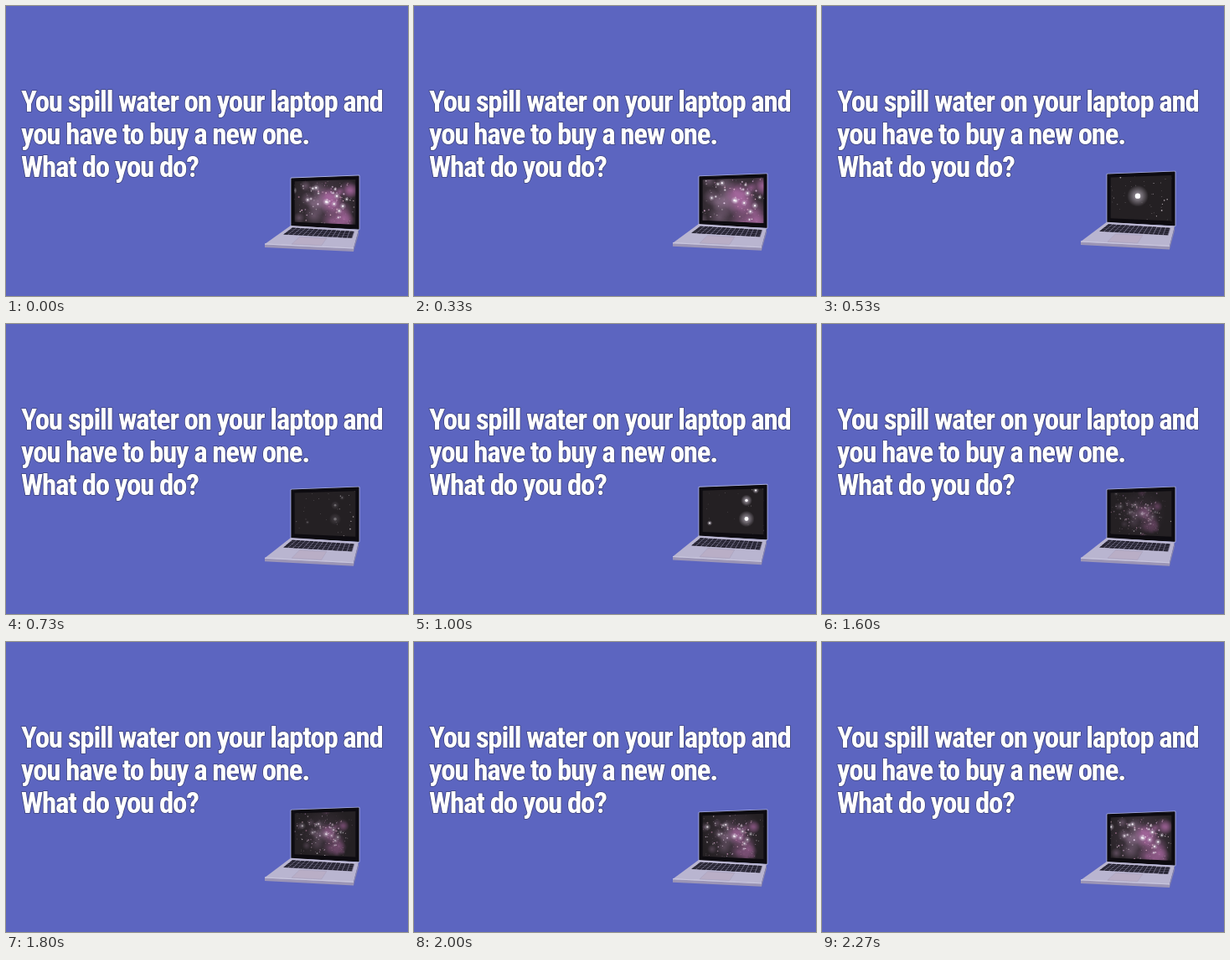
An HTML page with a canvas that plays this animation: 480 px wide and 346 px high, repeating every 2340 ms.

```html
<!DOCTYPE html>
<html lang="en">
<head>
<meta charset="utf-8">
<title>Laptop question</title>
<style>
  html, body { margin: 0; width: 100%; height: 100%; overflow: hidden; background: #5c65c0; }
  canvas, svg { position: absolute; left: 0; top: 0; display: block; }
  text {
    font-family: "Roboto Condensed", Roboto, sans-serif;
    font-weight: 900;
    font-stretch: 75%;
    letter-spacing: -.035em;
    fill: #fff;
    stroke: #3d437c;
    stroke-width: 1.6px;
    stroke-linejoin: round;
    paint-order: stroke;
  }
</style>
</head>
<body>
<canvas id="view" width="480" height="346"></canvas>
<svg id="words" width="480" height="346" font-size="35">
  <text x="18" y="126">You spill water on your laptop and</text>
  <text x="18" y="165">you have to buy a new one.</text>
  <text x="18" y="204">What do you do?</text>
</svg>
<script>
const LOOP = 2340, STEPS = 35;
const ctx = document.getElementById('view').getContext('2d');
const mix = (a, b, k) => a + (b - a) * k;
const ramp = (a, b, t) => Math.max(0, Math.min(1, (t - a) / (b - a)));

// Pick the type size whose first line spans the heading.
const words = document.getElementById('words');
const span = words.querySelector('text').getComputedTextLength();
words.setAttribute('font-size', Math.min(35, 35 * 437 / span));

let seed = 41;
const rnd = () => (seed = seed * 16807 % 2147483647) / 2147483647;
const gauss = () => rnd() + rnd() + rnd() - 1.5;
const scatter = (n, make) => Array.from({ length: n }, make);

const dust = scatter(170, () => ({
  x: gauss() * 48, y: gauss() * 38, r: .3 + rnd() ** 3 * .7,
  hue: 290 + rnd() * 50, light: 70 + rnd() * 30, a: .3 + rnd() * .6
}));
const stars = scatter(18, () => ({ x: gauss() * 52, y: gauss() * 40, r: .5 + rnd() * .6 }));
const clouds = scatter(26, () => {
  const x = gauss() * 36;
  return { x, y: gauss() * 32, r: 5 + rnd() * 8, rgb: x > 0 ? '200,120,190' : '150,120,150' };
});
const sparse = scatter(42, () => ({ x: (rnd() - .5) * 76, y: (rnd() - .5) * 56, r: .3 + rnd() ** 3 * .6 }));
const PAIR = [[16, -13, 1.7], [16, 9, 2.4], [27, -25, 1], [-28, 14, .8]];

// Corners in the low pose, clockwise from the back left.
const LID = [[341, 206], [421, 203], [421, 266], [341, 262]];
const BASE = [[340, 262], [421, 267], [415, 289], [309, 284]];

// The back rises more than the front, which tilts the machine.
const lift = y => y < 265 ? 10 + (265 - y) / 50 : 10 - (y - 265) / 6;
const raise = (quad, k) => quad.map(([x, y]) => [x, y - k * lift(y)]);

const at = ([a, b, c, d], u, v) =>
  [0, 1].map(i => mix(mix(a[i], b[i], u), mix(d[i], c[i], u), v));
const part = (q, u, v, u2, v2) => [at(q, u, v), at(q, u2, v), at(q, u2, v2), at(q, u, v2)];

function trace(points) {
  ctx.beginPath();
  points.forEach(p => ctx.lineTo(...p));
  ctx.closePath();
}
function fill(points, color) {
  trace(points);
  ctx.fillStyle = color;
  ctx.fill();
}
function stroke(points, color, width) {
  trace(points);
  ctx.strokeStyle = color;
  ctx.lineWidth = width;
  ctx.stroke();
}
function dot(x, y, r, color, alpha) {
  ctx.globalAlpha = alpha;
  ctx.fillStyle = color;
  ctx.beginPath();
  ctx.arc(x, y, r, 0, 7);
  ctx.fill();
  ctx.globalAlpha = 1;
}
function glow(x, y, r, rgb, alpha) {
  const g = ctx.createRadialGradient(x, y, 0, x, y, r);
  g.addColorStop(0, `rgba(${rgb},${alpha})`);
  g.addColorStop(1, `rgba(${rgb},0)`);
  ctx.fillStyle = g;
  ctx.fillRect(x - r, y - r, 2 * r, 2 * r);
}
function star(x, y, r, alpha) {
  glow(x, y, r * 4, '225,215,230', alpha * .7);
  dot(x, y, r, '#fff', alpha);
}

function drawCluster(t) {
  const age = (t - 1150 + LOOP) % LOOP;
  const show = ramp(0, 250, age) * ramp(1720, 1540, age);
  const near = show * ramp(250, 1200, age);
  const zoom = .6 + .7 * (age / 1500) ** 1.7;
  glow(0, 0, 42 * zoom, '130,100,130', .15 * show + .3 * near);
  clouds.forEach(c => glow(c.x * zoom, c.y * zoom, c.r * zoom, c.rgb, .12 * show + .38 * near));
  dust.forEach(s => dot(s.x * zoom, s.y * zoom, s.r * mix(.9, 1.15, near), `hsl(${s.hue} 45% ${s.light}%)`, s.a * mix(.7 * show, show, near)));
  stars.forEach(s => star(s.x * zoom, s.y * zoom, s.r, near));
}

function drawDeep(t) {
  const far = ramp(370, 500, t) * ramp(1450, 700, t);
  const drift = mix(.85, 1.7, ramp(400, 1200, t));
  sparse.forEach(s => dot(s.x * drift, s.y * drift, s.r, '#ddd2d8', far * .75));
  star(-4, -2, 3.2, ramp(400, 500, t) * ramp(730, 560, t));
  const pair = ramp(680, 900, t) * ramp(1250, 1050, t);
  const k = mix(.7, 1, ramp(680, 1000, t));
  PAIR.forEach(([x, y, r]) => star(x * k, y * k, r * k, pair));
}

function drawScreen(lid, t, k) {
  stroke(lid, '#a9aedc', 3);
  stroke(lid, '#0d0b10', 1.2);
  fill(lid, '#0d0b10');
  const glass = part(lid, .045, .06, .955, .92);
  fill(glass, '#242023');
  ctx.save();
  trace(glass);
  ctx.clip();
  ctx.translate(381, 233 - 10 * k);
  drawCluster(t);
  drawDeep(t);
  ctx.restore();
}

function drawBase(base) {
  const lip = [base[3], base[2], base[2].map((v, i) => v + 4 * i), base[3].map((v, i) => v + 4 * i)];
  const side = [base[1], base[2], lip[2], base[1].map((v, i) => v + 5 * i)];
  fill(base, '#b9b5d0');
  fill(lip, '#9b95b6');
  fill(side, '#8a86a9');
  stroke([base[3], base[2]], '#d0cde3', .7);
  const pad = part(base, .29, .54, .63, .94);
  fill(pad, '#b9aec6');
  stroke(pad, '#a69fbc', .6);

  const keys = part(base, .06, .1, .95, .47), rows = 5, cols = 14;
  fill(keys, '#77738c');
  for (let r = 0; r < rows; r++)
    for (let c = 0; c < cols; c++)
      fill(part(keys, c / cols, r / rows, (c + .83) / cols, (r + .85) / rows), '#1d1b28');
}

function draw(t) {
  const k = (1 - Math.cos(2 * Math.PI * t / LOOP)) / 2;
  ctx.fillStyle = '#5c65c0';
  ctx.fillRect(0, 0, 480, 346);
  ctx.lineJoin = 'round';
  drawScreen(raise(LID, k), t, k);
  drawBase(raise(BASE, k));
}

const start = performance.now();
function tick() {
  const now = (performance.now() - start) % LOOP;
  const step = Math.min(STEPS - 1, Math.floor((now + 10) * STEPS / LOOP));
  draw(step * LOOP / STEPS);
  requestAnimationFrame(tick);
}
tick();
</script>
</body>
</html>
```
